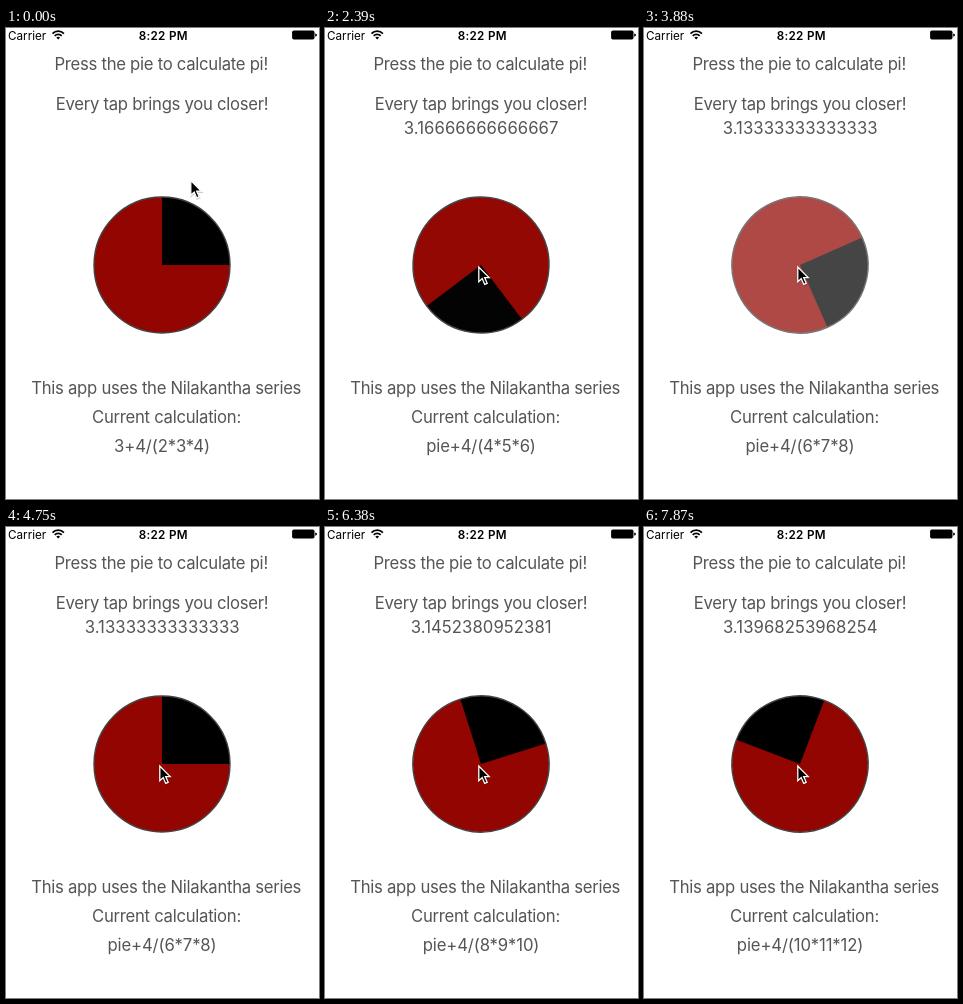
Recreate the animation shown at these times as an HTML page. Size 313 px wide and 471 px high, loop 8000 ms.

```html
<!DOCTYPE html>
<html lang="en">
<head>
<meta charset="utf-8">
<title>Pie calculator</title>
<style>
  html, body { margin: 0; width: 100%; height: 100%; overflow: hidden; background: #fff; }
  svg { display: block; width: 100%; height: 100%; }
  text {
    font-family: Inter, Roboto, sans-serif;
    font-feature-settings: "calt" 0;
    text-anchor: middle;
  }
  .label { font-size: 16.7px; letter-spacing: -.28px; fill: #555; }
  .status { font-size: 11.7px; }
  #result { letter-spacing: .06px; }
  #formula { letter-spacing: -.14px; }
</style>
</head>
<body>
<svg viewBox="0 0 313 471">
  <g class="status">
    <text x="2" y="11.5" style="text-anchor: start">Carrier</text>
    <text x="157.3" y="11.5" font-weight="600" letter-spacing=".3">8:22 PM</text>
    <g fill="none" stroke="#000" stroke-width="1.7">
      <path d="M46.5 5.6A7.6 7.6 0 0 1 57.9 5.6M48.7 7.9A4.8 4.8 0 0 1 55.7 7.9"/>
    </g>
    <path d="M52.2 11.6L50.3 9.6A2.7 2.7 0 0 1 54.1 9.6Z"/>
    <rect x="286.1" y="2.5" width="22.4" height="9" rx="1.8"/>
    <path d="M309.2 5.4Q311 5.8 311 7.1T309.2 8.8Z"/>
  </g>
  <g class="label">
    <text x="155.2" y="41.6">Press the pie to calculate pi!</text>
    <text x="156" y="81.6">Every tap brings you closer!</text>
    <text id="result" x="156.2" y="106.2"></text>
    <text x="160.2" y="366">This app uses the Nilakantha series</text>
    <text x="160.5" y="395">Current calculation:</text>
    <text id="formula" x="156" y="423.8"></text>
  </g>
  <g id="pie">
    <circle cx="156" cy="237" r="68" fill="#920500"/>
    <path d="M156 237V169A68 68 0 0 1 224 237Z"/>
    <circle cx="156" cy="237" r="68" fill="none" stroke="#444" stroke-width="1.4"/>
  </g>
  <g id="cursor">
    <path d="M.8 1.4V15.9L4.2 12.7L6.7 18.6L9.2 17.5L6.7 11.8H11.2Z" transform="translate(.4 1)" opacity=".2" stroke="#000" stroke-width="1.6"/>
    <path d="M.8 1.2V15.9L4.2 12.7L6.7 18.6L9.2 17.5L6.7 11.8H11.2Z" stroke="#fff" stroke-width="1.3"/>
  </g>
</svg>
<script>
const LOOP = 8000, SPIN = 1000, FADE = 480, DIM = 0.2;
const taps = [
  { down: 1790, up: 1993 },
  { down: 3590, up: 3700 },
  { down: 5200, up: 5429 },
  { down: 6980, up: 7072 }
];
// Stepped playback: start of each stretch and its step length
const pace = [[0, 150], [1190, 150], [3740, 144], [4750, 150], [5200, 147.5], [6980, 150]];
const SLACK = 11; // tolerance for uneven steps

const $ = id => document.getElementById(id);
const clamp = x => Math.min(1, Math.max(0, x));
const smooth = x => x * x * (3 - 2 * x);
const mix = (a, b, p) => a + (b - a) * p;

// cubic-bezier(.25, .1, .25, 1)
function ease(x) {
  const curve = (a, b, u) => 3 * a * u * (1 - u) ** 2 + 3 * b * u * u * (1 - u) + u ** 3;
  let lo = 0, hi = 1;
  for (let i = 0; i < 20; i++) {
    const mid = (lo + hi) / 2;
    if (curve(.25, .25, mid) < x) lo = mid; else hi = mid;
  }
  return curve(.1, 1, lo);
}

function step(t) {
  const [start, len] = pace.filter(p => p[0] <= t).pop();
  return start + Math.floor((t - start + SLACK) / len) * len;
}

// Nilakantha series after n terms, to 15 digits
function estimate(n) {
  let pi = 3;
  for (let i = 1; i <= n; i++) {
    const k = 2 * i;
    pi += (i % 2 ? 4 : -4) / (k * (k + 1) * (k + 2));
  }
  return String(Number(pi.toPrecision(15)));
}

function draw(time) {
  const t = step(time);
  const count = taps.filter(tap => t >= tap.up).length;
  const k = 2 * count + 2;
  $("result").textContent = count ? estimate(count) : "";
  $("formula").textContent = `${count ? "pie" : 3}+4/(${k}*${k + 1}*${k + 2})`;

  let angle = 0, alpha = 1;
  if (count) {
    const age = t - taps[count - 1].up;
    angle = 360 * clamp(age / SPIN);
    alpha = mix(DIM, 1, ease(clamp(age / FADE)));
  }
  if (taps.some(tap => t >= tap.down && t < tap.up)) alpha = DIM;
  $("pie").setAttribute("transform", `rotate(${angle % 360} 156 237)`);
  $("pie").setAttribute("opacity", alpha);

  const p = smooth(clamp((t - 600) / 740));
  $("cursor").setAttribute("transform", `translate(${mix(184, 153, p)} ${mix(151.3, 237.8, p)})`);
}

const begin = performance.now();
function tick() {
  draw((performance.now() - begin) % LOOP);
  requestAnimationFrame(tick);
}
tick();
</script>
</body>
</html>
```
